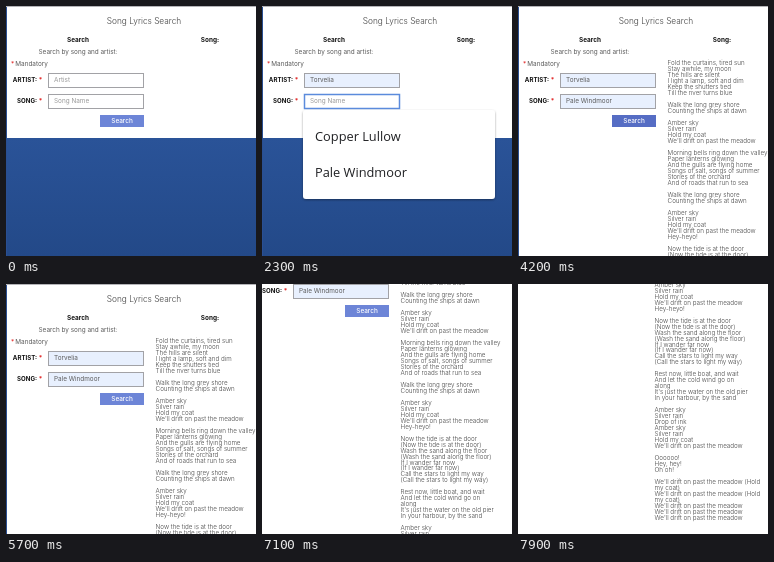
Write an HTML page that moves like this. It is 250x250 px and loops after 8 s.

```html
<!DOCTYPE html>
<html lang="en">
<head>
<meta charset="utf-8">
<title>Song Lyrics Search</title>
<style>
  html, body { margin: 0; width: 100%; height: 100%; overflow: hidden; background: #fff; }
  svg { display: block; width: 100vw; height: 100vh; }
  text { font-family: Inter, "Open Sans", sans-serif; font-size: 6.4px; fill: #5c5c5c; white-space: pre; }
  .head { font-size: 8.3px; font-weight: 300; fill: #444; }
  .bold { font-weight: 700; fill: #111; }
  .label { font-size: 6.1px; text-anchor: end; }
  .red, .bold.red { fill: #e02020; }
  .mid { text-anchor: middle; }
  .lyric { font-size: 6.25px; font-weight: 300; fill: #444; }
  .item { font-family: "Open Sans", "Noto Sans", sans-serif; font-size: 12.8px; font-weight: 500; fill: #202124; }
  .preview { font-family: "Liberation Sans", sans-serif; font-size: 5.9px; fill: #333; }
</style>
</head>
<body>
<svg id="stage" viewBox="0 0 250 250" xmlns="http://www.w3.org/2000/svg">
  <defs>
    <linearGradient id="sea" x1="0" y1="0" x2="0" y2="1">
      <stop offset="0" stop-color="#2a5398"/>
      <stop offset="1" stop-color="#234988"/>
    </linearGradient>
    <filter id="shade" x="-10%" y="-10%" width="120%" height="125%">
      <feDropShadow dx="0" dy="1" stdDeviation="1.2" flood-color="#000" flood-opacity=".38"/>
    </filter>
  </defs>
  <rect width="250" height="250" fill="#fff"/>
  <g id="page">
    <rect id="backdrop" y="132" width="250" height="118" fill="url(#sea)"/>
    <rect width="1" height="480" fill="#2a4f92"/>
    <rect width="250" height="1" fill="#b4b4b8"/>
    <text class="head mid" x="138" y="18">Song Lyrics Search</text>
    <text class="bold mid" x="72" y="36">Search</text>
    <text class="bold mid" x="204" y="36">Song:</text>
    <text class="mid" x="72" y="47.6">Search by song and artist:</text>
    <text class="red" x="5" y="60">*</text>
    <text x="9.3" y="60">Mandatory</text>
    <text class="bold label" x="31" y="76">ARTIST:</text>
    <text class="bold label" x="31" y="97">SONG:</text>
    <text class="bold red" x="32.8" y="76">*</text>
    <text class="bold red" x="32.8" y="97">*</text>
    <g id="fields"></g>
    <rect id="button" x="94" y="109" width="44" height="12"/>
    <text class="mid" x="116" y="117.3" style="fill:#fff;font-weight:500">Search</text>
    <g id="lyrics"></g>
  </g>
  <g id="menus"></g>
</svg>
<script>
const LOOP = 8000, ROW = 35.5, PAD = 9;
const $ = id => document.getElementById(id);

function add(parent, tag, attrs, content) {
  const el = document.createElementNS("http://www.w3.org/2000/svg", tag);
  for (const k in attrs) el.setAttribute(k, attrs[k]);
  if (content) el.textContent = content;
  parent.appendChild(el);
  return el;
}
const show = (el, on) => el.setAttribute("visibility", on ? "visible" : "hidden");
const within = (t, a, b) => t >= a && t < b;

const refrain = ["Walk the long grey shore", "Counting the ships at dawn", ""];
const drift = "We'll drift on past the meadow";
const chorus = ["Amber sky", "Silver rain", "Hold my coat", drift];
const echo = line => [line, `(${line})`];
const lyrics = [
  "Fold the curtains, tired sun", "Stay awhile, my moon", "The hills are silent",
  "I light a lamp, soft and dim", "Keep the shutters tied", "Till the river turns blue", "",
  ...refrain, ...chorus, "",
  "Morning bells ring down the valley", "Paper lanterns glowing", "And the gulls are flying home",
  "Songs of salt, songs of summer", "Stories of the orchard", "And of roads that run to sea", "",
  ...refrain, ...chorus, "Hey-heyo!", "",
  ...["Now the tide is at the door", "Wash the sand along the floor",
      "If I wander far now", "Call the stars to light my way"].flatMap(echo), "",
  "Rest now, little boat, and wait", "And let the cold wind go on", "along",
  "It's just the water on the old pier", "In your harbour, by the sand", "",
  "Amber sky", "Silver rain", "Drop of ink", ...chorus, "",
  "Oooooo!", "Hey, hey!", "Oh oh!", "",
  drift + " (Hold", "my coat)", drift + " (Hold", "my coat)", drift, drift, drift
];
lyrics.forEach((line, i) => {
  if (line) add($("lyrics"), "text", { class: "lyric", x: 149.6, y: 59.2 + i * 5.98 }, line);
});

// One input with its suggestion menu; times are in ms.
function makeField(o) {
  const f = $("fields"), y = o.y, base = y + 8.9;
  const box = add(f, "rect", { x: 42.5, y: y + .5, width: 95, height: 14 });
  const hint = add(f, "text", { x: 48, y: base, style: "fill:#999" }, o.hint);
  const preview = add(f, "text", { class: "preview", x: 48, y: base }, o.value);
  const value = add(f, "text", { x: 48, y: base }, o.value);
  const caret = add(f, "rect", { y: y + 3, width: 1, height: 8, fill: "#111" });
  const menu = add($("menus"), "g", {});
  const top = y + 16;
  add(menu, "rect", { x: 41, y: top, width: 192, height: o.items.length * ROW + 2 * PAD,
    rx: 3, fill: "#fff", filter: "url(#shade)" });
  const hover = add(menu, "rect", { x: 41, width: 192, height: ROW, fill: "#e8e8ec" });
  o.items.forEach((name, i) =>
    add(menu, "text", { class: "item", x: 53, y: top + PAD + ROW * i + 22.4 }, name));

  return t => {
    const filled = t >= o.pick, open = within(t, o.open, o.pick);
    const focus = within(t, o.open, o.blur), hovering = open && t >= o.hover;
    const row = o.items.length - (t < o.hover + 100 ? 2 : 1);
    box.setAttribute("fill", filled || hovering ? "#e8f0fe" : "#fff");
    box.setAttribute("stroke", focus ? "#5b8bdc" : "#a2a2a6");
    box.setAttribute("stroke-width", focus ? 1.5 : 1);
    show(hint, !filled && !hovering);
    show(value, filled);
    show(preview, hovering);
    preview.textContent = o.items[row];
    show(menu, open);
    show(hover, hovering);
    hover.setAttribute("y", top + PAD + ROW * row);
    caret.setAttribute("x", Math.round(48 + value.getComputedTextLength()));
    show(caret, within(t, o.pick, o.pick + 500));
  };
}

const fields = [
  makeField({ y: 67, hint: "Artist", value: "Torvelia", items: ["ЛУМО", "Torrvelia", "Torvelia"],
    open: 600, hover: 900, pick: 1500, blur: 2300 }),
  makeField({ y: 88, hint: "Song Name", value: "Pale Windmoor", items: ["Copper Lullow", "Pale Windmoor"],
    open: 2300, hover: 2600, pick: 3000, blur: 3700 })
];

// time, x, y of the page
const path = [
  [5700, 0, 0], [6300, -1, -14], [6400, -1, -14], [6500, -1, -15],
  [6700, -2, -19], [6800, -2, -19], [7100, -11, -88], [7500, -13, -168],
  [7700, -13.4, -197], [7800, -13.4, -203], [7900, -13.4, -206], [8000, -13.4, -206]
];
function pan(t) {
  if (t <= path[0][0]) return [0, 0];
  const i = path.findIndex(p => p[0] >= t), a = path[i - 1], b = path[i];
  const k = (t - a[0]) / (b[0] - a[0]);
  return [1, 2].map(n => Math.round(a[n] + (b[n] - a[n]) * k));
}

function buttonColor(t) {
  if (within(t, 3800, 5000)) return "#566dc4";
  return within(t, 3700, 3800) || within(t, 5000, 5100) ? "#627acd" : "#6d85d7";
}

function draw(now) {
  const t = Math.floor((now % LOOP) / 100) * 100;
  const found = t >= 4200;
  fields.forEach(update => update(t));
  $("button").setAttribute("fill", buttonColor(t));
  show($("lyrics"), found);
  show($("backdrop"), !found);
  $("page").setAttribute("transform", `translate(${pan(t)})`);
}

const start = performance.now();
function tick() {
  draw(performance.now() - start);
  requestAnimationFrame(tick);
}
tick();
</script>
</body>
</html>
```
